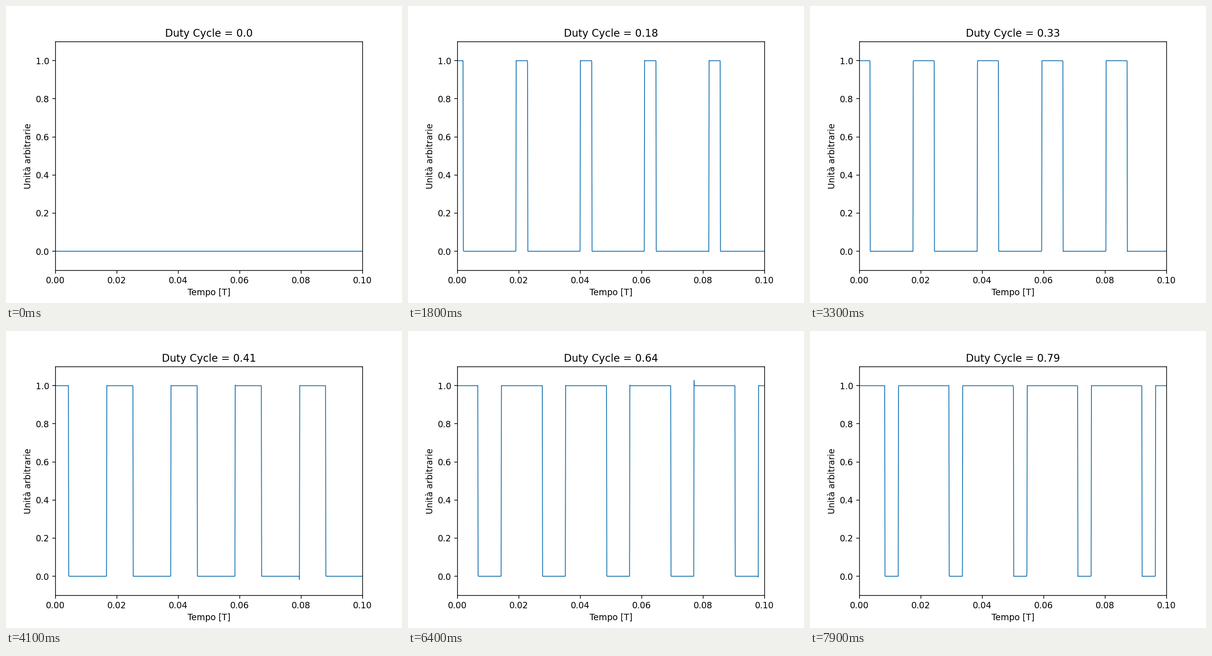
These frames come from a looping animation (864 by 648 pixels, 8000 ms). A matplotlib script:

```python
import numpy as np
import matplotlib.pyplot as plt
from matplotlib.animation import FuncAnimation

FRAMES = 80
OMEGA = 300      # angular frequency of the pulse train
TERMS = 10000    # harmonics in the Fourier partial sum

t = np.linspace(0, 0.1, 1000)
n = np.arange(1, TERMS + 1)
duty = np.arange(FRAMES) / 100

# Partial sums for every duty cycle at once; the Gibbs ripple
# shows up as small spikes wherever a sample falls next to an edge.
coeffs = 2 / (np.pi * n) * np.sin(np.pi * np.outer(duty, n))
waves = duty[:, None] + coeffs @ np.cos(OMEGA * np.outer(n, t))

plt.rcParams["font.family"] = "DejaVu Sans"
fig, ax = plt.subplots(figsize=(6.4, 4.8), dpi=135)
ax.set(xlim=(0, 0.1), ylim=(-0.1, 1.1),
       xlabel="Tempo [T]", ylabel="Unità arbitrarie")
line, = ax.plot(t, waves[0], color="C0", lw=1)
title = ax.set_title("Duty Cycle = 0.0")


def update(i):
    line.set_ydata(waves[i])
    title.set_text(f"Duty Cycle = {float(duty[i])}")
    return line, title


ani = FuncAnimation(fig, update, frames=FRAMES, interval=100,
                    repeat=True, repeat_delay=0, blit=False)
plt.show()
```
